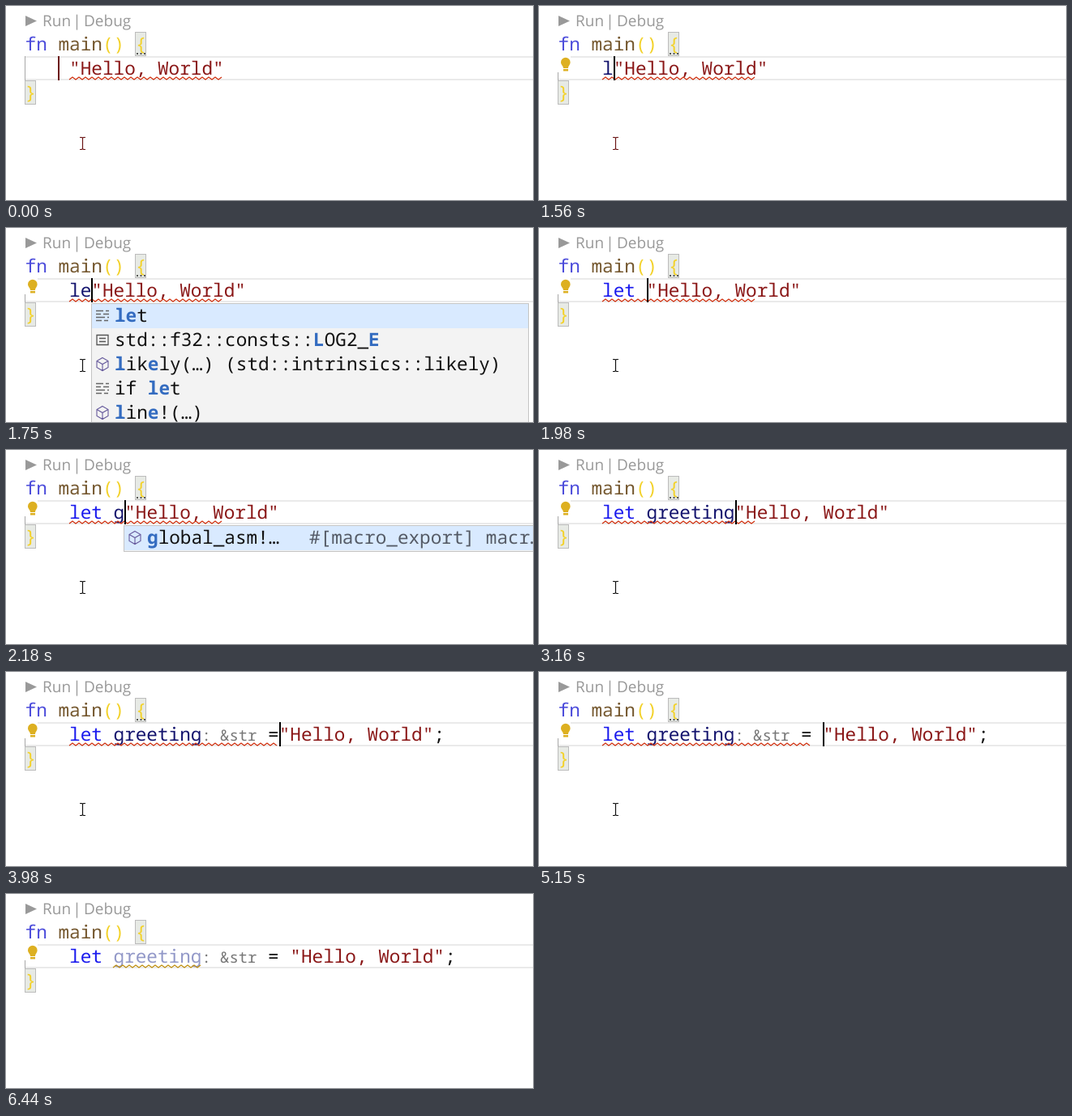
These frames come from a looping animation (650x240 px, 6540 ms). An HTML page:

```html
<!DOCTYPE html>
<html lang="en">
<head>
<meta charset="utf-8">
<style>
  html, body { margin: 0; width: 100%; height: 100%; overflow: hidden; background: #fff; }
  svg { display: block; width: 650px; height: 240px; }
  text { font: 22.7px "Noto Sans Mono", monospace; white-space: pre; text-rendering: geometricPrecision; }
  .lens { font: 19px "Open Sans", sans-serif; fill: #999; }
  .hint { font-size: 18.9px; fill: #777; }
  .hit { font-weight: 700; fill: #346cc0; }
</style>
</head>
<body>
<svg id="stage" viewBox="0 0 650 240"></svg>
<script>
const LOOP = 6540, LEFT = 23.6, CHAR = 13.62, HINT = 68;
const RED = "#d0300f", NAVY = "#14146e", BLUE = "#1a1aee", YELLOW = "#f3d22b";

const leRows = [
  ["keyword", "*le*t"],
  ["constant", "std::f32::consts::*L*OG2_*E*"],
  ["cube", "*l*ik*e*ly(…) (std::intrinsics::likely)"],
  ["keyword", "if *le*t"],
  ["cube", "*l*in*e*!(…)"],
];
const letRows = [["keyword", "*let*"], ["keyword", "if *let*"]];
const globalRows = [["cube", "*g*lobal_asm!…", "#[macro_export] macr…"]];

// Each key changes only the listed properties.
const keys = [
  [0, { typed: "", caret: true, atIndent: true, bulb: false, errors: true, unused: false,
        hint: false, popup: null, pointer: 170, ink: "#6b1515" }],
  [360, { caret: false }],
  [820, { caret: true, atIndent: false }],
  [1050, { bulb: true }],
  [1330, { caret: false }],
  [1560, { typed: "l", caret: true }],
  [1700, { typed: "le", ink: "#111" }],
  [1750, { popup: { col: 6, rows: leRows } }],
  [1850, { typed: "let" }],
  [1910, { popup: { col: 6, rows: letRows } }],
  [1980, { typed: "let ", popup: null }],
  [2130, { typed: "let g" }],
  [2180, { popup: { col: 9, rows: globalRows } }],
  [2360, { typed: "let gr" }],
  [2410, { popup: null }],
  [2540, { typed: "let gre" }],
  [2690, { typed: "let gree" }],
  [2880, { typed: "let greet" }],
  [2970, { typed: "let greeti" }],
  [3070, { typed: "let greetin" }],
  [3160, { typed: "let greeting" }],
  [3440, { typed: "let greeting " }],
  [3900, { typed: "let greeting =" }],
  [3980, { hint: true }],
  [4180, { typed: "let greeting = " }],
  [4640, { caret: false }],
  [5150, { caret: true }],
  [5230, { errors: false }],
  [5380, { unused: true }],
  [5560, { pointer: 184 }],
  [5610, { pointer: 203 }],
  [5660, { pointer: 0, caret: false }],
  [6170, { caret: true }],
  [6440, { caret: false }],
];

const colX = col => LEFT + col * CHAR;
const rect = (x, y, w, h, fill, more = "") =>
  `<rect x="${x}" y="${y}" width="${w}" height="${h}" fill="${fill}" ${more}/>`;
const path = (d, stroke, width = 1.3) =>
  `<path d="${d}" fill="none" stroke="${stroke}" stroke-width="${width}"/>`;
const span = (text, fill) => `<tspan fill="${fill}">${text}</tspan>`;
const text = (x, y, body, fill = "#111") => `<text x="${x}" y="${y}" fill="${fill}">${body}</text>`;
const lens = (x, body) => `<text class="lens" x="${x}" y="25">${body}</text>`;

function squiggle(from, to, color) {
  let d = `M${from} 91`;
  for (let x = from + 4, up = true; x <= to; x += 4, up = !up) d += `L${x} ${up ? 88 : 91}`;
  return path(d, color);
}

const braceBox = (x, y) =>
  rect(x + .5, y + .5, 13, 29, "#e7eae5", 'stroke="#bcbcbc"');

const icons = {
  keyword: path("M-8-6H1M4-6H8M-8-2H-2M1-2H8M-8 2H3M6 2H8M-8 6H-1M2 6H7", "#666"),
  constant: path("M-7-6H7V6H-7ZM-4-2H4M-4 2H4", "#555"),
  cube: path("M0-8L7-4V4L0 8L-7 4V-4ZM-7-4L0 0L7-4M0 0V8", "#665a9c", 1.1),
};

function popup({ col, rows }) {
  const x = Math.floor(colX(col) - .3), width = 539, step = 30;
  let out = rect(x + .5, 93.5, width, rows.length * step + 2, "#f3f3f3", 'stroke="#c4c4c4"');
  rows.forEach(([icon, label, detail], i) => {
    const y = 94 + i * step;
    if (!i) out += rect(x + 1, y, width - 1, step, "#d9eaff");
    const body = label.replace(/\*(.+?)\*/g, '<tspan class="hit">$1</tspan>');
    out += `<g transform="translate(${x + 14} ${y + 14.5})">${icons[icon]}</g>` + text(x + 29, y + 22, body);
    if (detail) out += text(x + 229, y + 22, detail, "#555b66");
  });
  return out;
}

function codeLine(s) {
  const name = s.typed.slice(4, 12), hint = s.hint ? '<tspan class="hint">: &amp;str</tspan>' : "";
  const head = s.typed.slice(0, 4);
  return text(colX(4), 85,
    span(head, head.startsWith("let") ? BLUE : NAVY) +
    span(name, s.unused ? "#9298c8" : NAVY) + hint +
    span(s.typed.slice(12), "#111") +
    span('"Hello, World"', "#8a1717") + (s.hint ? span(";", "#111") : ""));
}

const bulb = rect(23, 62, 16, 20, "#fff") +
  '<path d="M30 77C30 74 27 73 27 69.5A5.8 5.8 0 0 1 38.6 69.5C38.6 73 36 74 36 77Z" fill="#ddb021"/>' +
  rect(30, 78, 6, 2.5, "#ddb021");

const pointer = (y, ink) =>
  path(`M91 ${y - 7.5}H93.5L94.5 ${y - 6.5}L95.5 ${y - 7.5}H98M94.5 ${y - 7}V${y + 7}M91 ${y + 7.5}H93.5L94.5 ${y + 6.5}L95.5 ${y + 7.5}H98`, ink, 1.2);

function draw(s) {
  const shift = s.hint ? HINT : 0;
  const caretX = s.atIndent ? 64 : Math.round(colX(4 + s.typed.length) + shift);
  return '<path d="M24 12L38 18.5L24 25Z" fill="#999"/>' +
    lens(45, "Run") + lens(82.3, "|") + lens(96, "Debug") +
    rect(23, 62, 627, 2, "#eaeaea") + rect(23, 90, 627, 2, "#eaeaea") +
    rect(23, 62, 1, 30, "#a8a8a8") +
    braceBox(159, 32) + braceBox(23, 92) +
    text(LEFT, 55, span("fn ", "#4d4ddb") + span("main", "#75582f") + span("() {", YELLOW)) +
    text(LEFT, 115, "}", YELLOW) +
    (s.errors ? [161, 165.5, 170].map(x => rect(x, 58, 2, 2, "#555")).join("") : "") +
    (s.bulb ? bulb : "") +
    codeLine(s) +
    (s.errors ? squiggle(78, 269 + shift, RED) : "") +
    (s.unused ? squiggle(132, 242, "#bf8f10") : "") +
    (s.caret ? rect(caretX, 62, 2, 30, s.atIndent ? "#6b1515" : "#000") : "") +
    (s.popup ? popup(s.popup) : "") +
    (s.pointer ? pointer(s.pointer, s.ink) : "");
}

const stage = document.getElementById("stage");
const start = performance.now();
let shown = 0;

function frame() {
  const t = (performance.now() - start) % LOOP;
  const past = keys.filter(([at]) => at <= t);
  if (past.length !== shown) {
    shown = past.length;
    stage.innerHTML = draw(Object.assign({}, ...past.map(([, change]) => change)));
  }
  requestAnimationFrame(frame);
}
frame();
</script>
</body>
</html>
```
